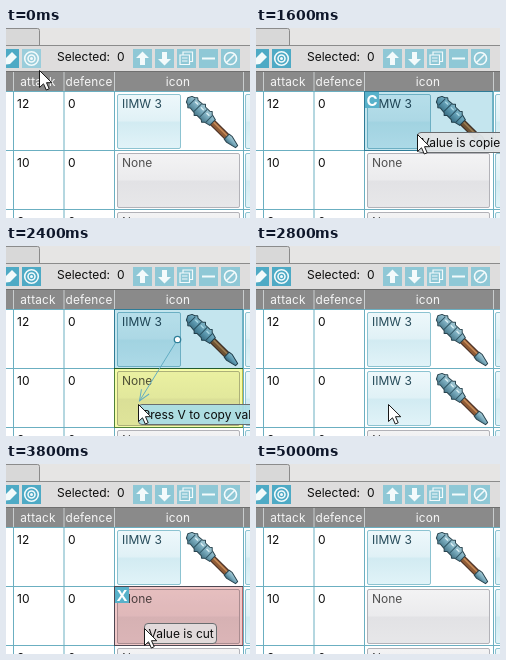
An HTML page for the animation above (5400 ms loop, 244 px wide and 190 px high).

```html
<!DOCTYPE html>
<html lang="en">
<head>
<meta charset="utf-8">
<title>Copy and cut cell values</title>
<style>
  html, body { margin: 0; width: 100%; height: 100%; overflow: hidden; background: #fff; }
  svg { display: block; width: 100vw; height: 100vh; }
  text { font: 12px Inter, "Open Sans", sans-serif; fill: #0c0c0c; white-space: pre; }
  .head { font-size: 11.8px; letter-spacing: .2px; fill: #f6f6f6; }
  .value { fill: #244a59; }
  .none { fill: #505050; }
  .badge { font-weight: 700; font-size: 15px; fill: #fff; }
  .glyph { fill: none; stroke: #f3fafb; stroke-width: 1.6; }
  .tint { mix-blend-mode: multiply; }
</style>
</head>
<body>
<svg viewBox="0 0 244 190" preserveAspectRatio="none">
  <defs>
    <linearGradient id="blue" x2="0" y2="1">
      <stop offset="0" stop-color="#eef8fb"/>
      <stop offset=".48" stop-color="#e0f1f6"/>
      <stop offset=".52" stop-color="#d2ebf2"/>
      <stop offset="1" stop-color="#e1f3f8"/>
    </linearGradient>
    <linearGradient id="grey" x2="0" y2="1">
      <stop offset="0" stop-color="#f3f3f4"/>
      <stop offset=".48" stop-color="#ebebed"/>
      <stop offset=".52" stop-color="#e2e2e5"/>
      <stop offset="1" stop-color="#e7e7e9"/>
    </linearGradient>
    <linearGradient id="steel" x2="0" y2="1">
      <stop offset="0" stop-color="#a9cdd8"/>
      <stop offset=".5" stop-color="#79aabc"/>
      <stop offset="1" stop-color="#3f6f82"/>
    </linearGradient>
    <g id="mace" stroke-linejoin="round" transform="rotate(45)">
      <path d="M31 -3H56V3H31Z" fill="#8f5b36" stroke="#432a20"/>
      <path d="M33 -1H55" stroke="#c58a58" stroke-width="1.500"/>
      <path d="M54 -3.500L58 -4L68 -1.500V1.500L58 4L54 3.500Z" fill="url(#steel)" stroke="#29444f"/>
      <path d="M1 -4L4 -5L6 -7L8 -5.500L14 -6L16 -8L18 -6L24 -6L26 -7.500L28 -5.500L34 -4V4L28 5.500L26 7.500L24 6L18 6L16 8L14 6L8 5.500L6 7L4 5L1 4L-1 0Z" fill="url(#steel)" stroke="#29444f"/>
      <path d="M5 -4.500V4.500M13 -5.500V5.500M21 -5.500V5.500M29 -5V5" stroke="#315766"/>
      <path d="M7 -2.500H11M15 -2.500H19M23 -2.500H27" stroke="#d8edf2" stroke-width="1.500"/>
    </g>
    <g id="valueCell">
      <rect x="111.5" y="66.5" width="63" height="54" rx="1.5" fill="url(#blue)" stroke="#8cc3d1"/>
      <text class="value" x="116" y="80">IIMW 3</text>
      <use href="#mace" x="182" y="70" transform="translate(182 70)" style="display:none"/>
      <g transform="translate(182.500 70.500)"><use href="#mace"/></g>
    </g>
    <g id="noneCell">
      <rect x="111.5" y="66.5" width="122" height="54" rx="1.5" fill="url(#grey)" stroke="#b2b2b8"/>
      <text class="none" x="116" y="80">None</text>
    </g>
  </defs>

  <rect width="244" height="190" fill="#fff"/>
  <rect width="244" height="18" fill="#e6e5e4"/>
  <rect y="18" width="244" height="26" fill="#dedddd"/>
  <path d="M0 0H31.500Q33.500 0 33.500 2V17.500H0Z" fill="#d8d8d8"/>
  <path d="M0 .5H31.500Q33.500 .5 33.500 2.500V17.500M0 17.500H244" fill="none" stroke="#8b8b8b"/>
  <g id="tools"></g>
  <text x="51" y="33">Selected:</text>
  <text x="111" y="33">0</text>
  <g id="grid"></g>
  <use href="#valueCell"/>
  <use id="lowerValue" href="#valueCell" y="59"/>
  <use id="lowerNone" href="#noneCell" y="59"/>
  <use href="#noneCell" y="118"/>
  <rect id="upperTint" class="tint" x="108.500" y="63.500" width="128" height="59"/>
  <rect id="lowerTint" class="tint" x="108.500" y="122.500" width="128" height="59"/>
  <g id="badge">
    <rect x="109" y="64" width="14" height="16" fill="#58b1ca"/>
    <text class="badge" x="116" y="77.500" text-anchor="middle"></text>
  </g>
  <g id="link" stroke="#62adc3" fill="none">
    <path/>
    <path id="tip" d="M-11 -4.500L0 0L-11 4.500"/>
    <circle cx="171.500" cy="93.500" r="3.200" fill="#fff" stroke="#2f7f99" stroke-width="1.300"/>
  </g>
  <g id="hint">
    <rect x="-.5" y="-1.500" height="20" rx="3.500" stroke="#696d70"/>
    <text x="3.500" y="12.500"></text>
  </g>
  <path id="cursor" d="M0 0V17L4 13.300L6.800 19.500L9.700 18.200L7 12.200H12.300Z" fill="#fff" stroke="#181818" stroke-linejoin="round"/>
</svg>
<script>
const $ = id => document.getElementById(id);
const set = (el, attrs) => { for (const k in attrs) el.setAttribute(k, attrs[k]); };
const show = (el, on) => { el.style.display = on ? '' : 'none'; };
const move = (el, x, y, turn = 0) => el.setAttribute('transform', `translate(${x} ${y}) rotate(${turn})`);

document.querySelector('#valueCell > use').remove();

const tool = (x, color, glyph, id = '') => `<g transform="translate(${x} 21)">
  <rect ${id} width="19" height="19" fill="${color}"/><g class="glyph">${glyph}</g></g>`;
const arrow = '<path d="M9.500 2.500L16 9H12V16H7V9H3Z" fill="#f3fafb" stroke="none"/>';
const pale = '#8fc8d6', strong = '#4eaac5';
$('tools').innerHTML =
  tool(-6, strong, '<path d="M3 16L5 10L12 3L17 8L10 15Z" fill="#f3fafb" stroke="none"/>') +
  tool(16, strong, '<circle cx="9.500" cy="9.500" r="6.800"/><circle cx="9.500" cy="9.500" r="3.500"/><circle cx="9.500" cy="9.500" r=".7"/>', 'id="target"') +
  tool(127, pale, arrow) +
  tool(149, pale, `<g transform="rotate(180 9.500 9.500)">${arrow}</g>`) +
  tool(171, pale, '<path d="M6 6V3H15.500V12.500H13M3 6H12.500V15.500H3ZM5 9H10.500M5 12H10.500" stroke-width="1.200"/>') +
  tool(193, pale, '<path d="M3 9.500H16" stroke-width="2"/>') +
  tool(215, pale, '<circle cx="9.500" cy="9.500" r="6"/><path d="M5 14L14 5"/>');

const columns = [7.5, 58, 108.5, 237.5], rows = [63.5, 122.5, 181.5];
const label = (x, text) => `<text class="head" x="${x}" y="58" text-anchor="middle">${text}</text>`;
let grid = '<rect y="43" width="244" height="20.500" fill="#8a8a8a"/><path d="M0 43.500H244" stroke="#6f6f6f"/>';
columns.forEach(x => { grid += `<path d="M${x} 44V63" stroke="#c9cdce"/><path d="M${x} 63V190" stroke="#6bafc1"/>`; });
rows.forEach((y, i) => {
  grid += `<path d="M0 ${y}H244" stroke="#6bafc1"/>
    <text x="11" y="${y + 16.5}">${['12', '10', '8'][i]}</text><text x="62" y="${y + 16.5}">0</text>
    <rect x="239.500" y="${y + 3}" width="40" height="54" rx="1.500" fill="url(#blue)" stroke="#8cc3d1"/>`;
});
$('grid').innerHTML = grid + label(32, 'attack') + label(83, 'defence') + label(172, 'icon');

const stops = [
  [0, 34, 42], [200, 24, 35], [400, 21, 32], [600, 186, 71], [800, 180, 99], [1000, 162, 106],
  [1800, 160, 130], [2000, 148, 148], [2200, 136, 160], [2400, 133, 158],
  [3000, 135, 160], [3200, 137, 162], [3400, 139, 164], [4600, 134, 167], [4800, 122, 177]
];

function tint(el, alpha, fill, stroke) {
  show(el, alpha > 0);
  set(el, { fill, stroke, opacity: alpha });
}

function draw(time) {
  const t = Math.min(Math.floor(time / 200) * 200, 5000);
  const within = (a, b) => t >= a && t < b;
  const [, x, y] = stops.findLast(s => s[0] <= t);
  const copied = within(1400, 1800), linking = within(1800, 2600), cut = within(3600, 4400);

  set($('target'), { fill: t < 600 ? '#9acddb' : strong });
  const pasted = within(2600, 3600);
  show($('lowerValue'), pasted);
  show($('lowerNone'), !pasted);

  tint($('upperTint'), copied || linking ? 1 : 0, '#c4e5ee', '#6fb4c7');
  const fade = t === 3600 || t === 4400 ? .5 : 1;
  if (linking) tint($('lowerTint'), 1, '#f6fca8', '#b9bd4e');
  else tint($('lowerTint'), within(3600, 4600) ? fade : 0, '#f2c8c8', '#b5696d');

  show($('badge'), copied || cut);
  move($('badge'), 0, cut ? 59 : 0);
  $('badge').lastElementChild.textContent = cut ? 'X' : 'C';

  show($('link'), linking);
  if (linking) {
    const ex = x + .5, ey = y - 3;
    const angle = Math.atan2(ey - 93.5, ex - 171.5);
    set($('link').firstElementChild, {
      d: `M${171.5 + 3 * Math.cos(angle)} ${93.5 + 3 * Math.sin(angle)}L${ex} ${ey}`
    });
    move($('tip'), ex, ey, angle * 180 / Math.PI);
  }

  const hint = within(1600, 1800) ? ['Value is copied', 93, '#e4e6e7']
    : linking ? ['Press V to copy value', 132, '#aadde6']
    : within(3800, 4400) ? ['Value is cut', 72, '#e3dede'] : null;
  show($('hint'), hint);
  if (hint) {
    move($('hint'), x, linking ? y + 2 : cut ? y - 3 : y);
    $('hint').lastElementChild.textContent = hint[0];
    set($('hint').firstElementChild, { width: hint[1], fill: hint[2], 'fill-opacity': .94 });
  }

  show($('cursor'), t < 5000);
  move($('cursor'), x - .5, y + .5);
}

const start = performance.now();
function tick() {
  draw((performance.now() - start) % 5400);
  requestAnimationFrame(tick);
}
tick();
</script>
</body>
</html>
```
